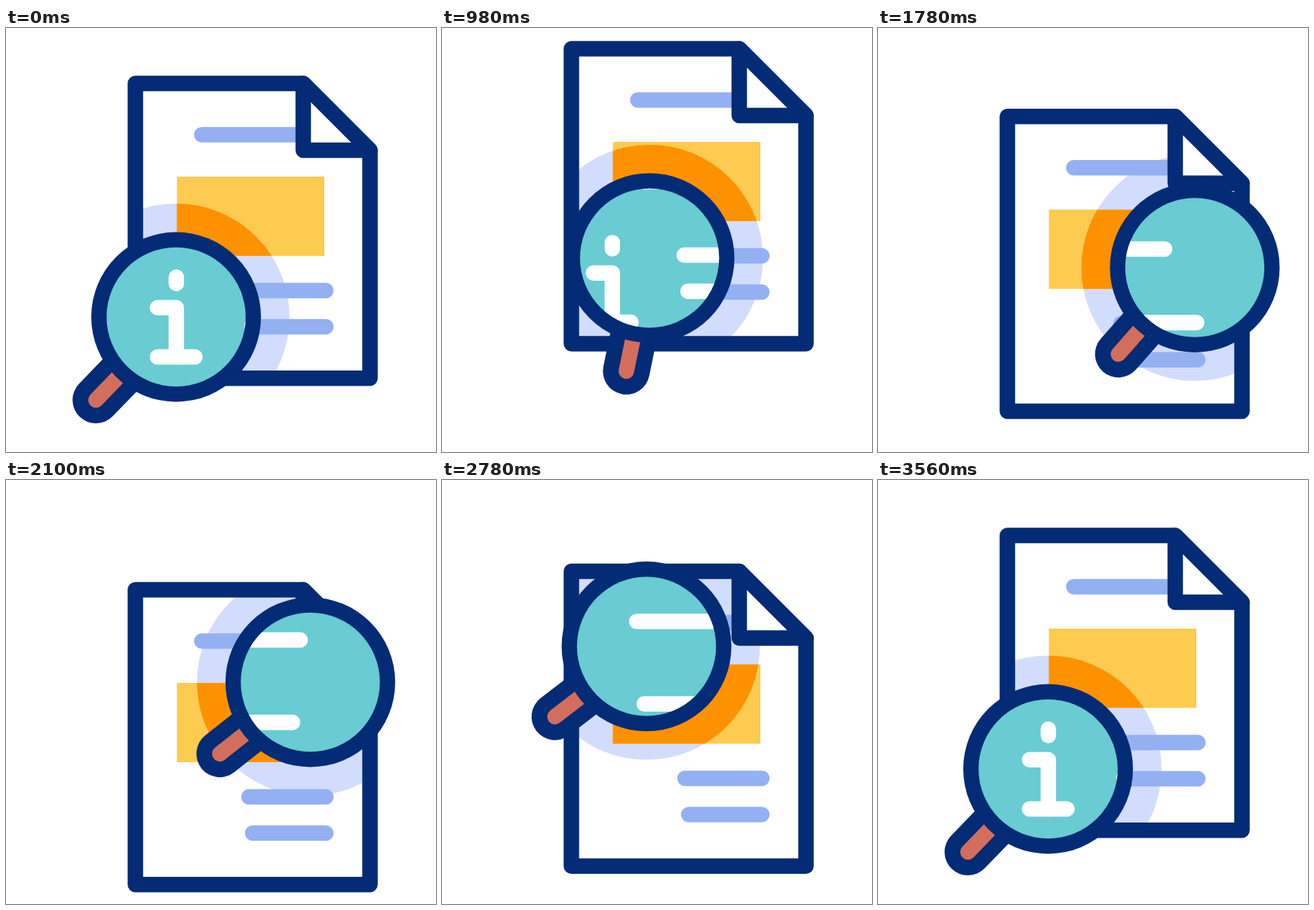
Animation of 570 by 562 pixels, one loop 3580 ms. Source, as an HTML page with a canvas:

```html
<!DOCTYPE html>
<html lang="en">
<head>
<meta charset="utf-8">
<title>Document search</title>
<style>
  html, body { margin: 0; width: 100%; height: 100%; overflow: hidden; background: #fff; }
  canvas { display: block; }
</style>
</head>
<body>
<canvas id="stage" width="570" height="562"></canvas>
<script>
const ctx = document.getElementById('stage').getContext('2d');
const LOOP = 3580, LINE = 20.5;
const NAVY = '#042b76', BLUE = '#93b0f3', HALO = '#d2dcfd', YELLOW = '#fdcb50',
      ORANGE = '#fe9100', TEAL = '#68ccd2', RED = '#d36e5c', WHITE = '#fff';

// Smooth progress from 0 to 1 between two times.
function ease(t, start, end) {
  const s = Math.min(1, Math.max(0, (t - start) / (end - start)));
  return s * s * (3 - 2 * s);
}

// Each value is its rest position plus eased moves that add up to zero over the loop.
function poseAt(t) {
  const left = ease(t, 180, 680), right = ease(t, 680, 1290), climb = ease(t, 1290, 2330),
        twist = ease(t, 1290, 2200), sweep = ease(t, 2170, 3180), home = ease(t, 3190, 3560);
  return {
    pageY: -52.5 * ease(t, 200, 775) + 129.5 * ease(t, 775, 2280) - 77 * ease(t, 2280, 3470),
    x: 225.5 - 107 * left + 319.5 * right - 39.5 * climb - 194.5 * sweep + 21.5 * home,
    y: 383 - 40 * left + 16 * right - 186 * climb + 210 * home,
    angle: (44 - 47.6 * left + 31 * right + 25.1 * twist - 8.5 * home) * Math.PI / 180
  };
}

function polygon(...points) {
  const path = new Path2D();
  points.forEach(([x, y]) => path.lineTo(x, y));
  return path;
}

function disc(x, y, r) {
  const path = new Path2D();
  path.arc(x, y, r, 0, 2 * Math.PI);
  return path;
}

function fill(path, color) {
  ctx.fillStyle = color;
  ctx.fill(path);
}

function stroke(path, color, width = LINE) {
  ctx.strokeStyle = color;
  ctx.lineWidth = width;
  ctx.stroke(path);
}

function bar(x1, x2, y, color) {
  stroke(polygon([x1, y], [x2, y]), color);
}

function clipped(path, draw) {
  ctx.save();
  ctx.clip(path);
  draw();
  ctx.restore();
}

const foldTop = [394, 73.5], foldSide = [482.5, 162];
const page = polygon([171.5, 73.5], foldTop, foldSide, [482.5, 464.3], [171.5, 464.3]);
const fold = polygon(foldTop, [394, 162], foldSide);
const block = new Path2D();
page.closePath();
fold.closePath();
block.rect(226.5, 197, 195.5, 105);

function drawPage(halo) {
  fill(page, WHITE);
  clipped(page, () => fill(halo, HALO));
  bar(259.5, 394, 141.5, BLUE);
  bar(322, 424, 348, BLUE);
  bar(327, 424, 396, BLUE);
  fill(block, YELLOW);
  clipped(block, () => fill(halo, ORANGE));
  fill(fold, WHITE);
  stroke(fold, NAVY);
  stroke(page, NAVY);
}

function drawHandle({ x, y, angle }) {
  const along = r => [x - r * Math.sin(angle), y + r * Math.cos(angle)];
  const shaft = polygon(along(70), along(153));
  stroke(shaft, NAVY, 62);
  stroke(shaft, RED);
}

function drawLens({ x, y }) {
  const glass = disc(x, y, 92.2);
  fill(disc(x, y, 112.5), NAVY);
  fill(glass, TEAL);
  clipped(glass, () => {
    bar(258, 390, 140, WHITE);
    bar(268, 380, 249.3, WHITE);
    bar(321, 422.5, 346.8, WHITE);
    bar(326, 422.5, 394.8, WHITE);
    // Letter i: dot, stem, foot
    stroke(polygon([225.8, 330.3], [225.8, 338.7]), WHITE);
    stroke(polygon([200.8, 370.7], [225.8, 370.7], [225.8, 436]), WHITE);
    bar(200.8, 250.5, 436, WHITE);
  });
}

function frame() {
  const pose = poseAt(performance.now() % LOOP);
  ctx.setTransform(1, 0, 0, 1, 0, 0);
  ctx.clearRect(0, 0, 570, 562);
  ctx.lineCap = ctx.lineJoin = 'round';
  ctx.translate(0, pose.pageY);
  drawPage(disc(pose.x, pose.y, 150.3));
  drawHandle(pose);
  drawLens(pose);
  requestAnimationFrame(frame);
}
frame();
</script>
</body>
</html>
```
